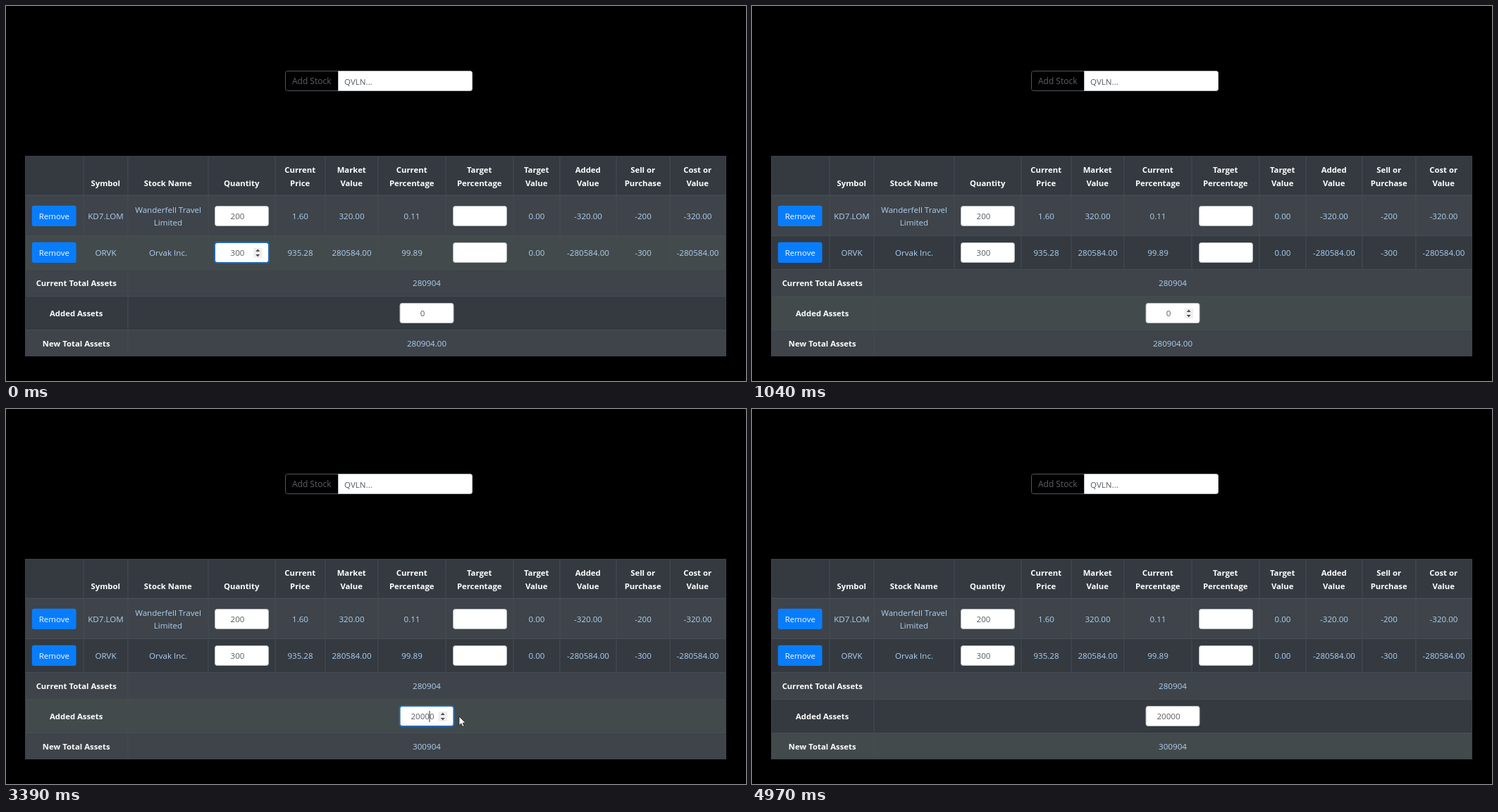
An HTML page for the animation above (5.01 s loop, 1050 px wide and 533 px high).

```html
<!DOCTYPE html>
<html lang="en">
<head>
<meta charset="utf-8">
<title>Portfolio table</title>
<style>
html, body { margin: 0; width: 100%; height: 100%; overflow: hidden; background: #000; }
svg { display: block; width: 1050px; height: 533px; }
text { font: 11.6px "Open Sans", "Noto Sans", sans-serif; fill: #b0d0f4; text-anchor: middle; }
.head { font-weight: 700; font-size: 11.35px; fill: #fff; }
.value { fill: #555b61; }
.start { text-anchor: start; }
.button { fill: #f8fbff; font-size: 11.5px; }
</style>
</head>
<body>
<svg id="stage" viewBox="0 0 1050 533"></svg>
<script>
const LOOP = 5010;
const stage = document.getElementById('stage');

function add(tag, attrs, content = '') {
  const el = document.createElementNS('http://www.w3.org/2000/svg', tag);
  set(el, attrs);
  el.textContent = content;
  return stage.appendChild(el);
}
function set(el, attrs) {
  for (const key in attrs) el.setAttribute(key, attrs[key]);
}
const rect = (x, y, width, height, fill, more) => add('rect', { x, y, width, height, fill, ...more });
const text = (x, y, content, cls = '') => add('text', { x, y, class: cls }, content);
const show = (el, on) => el.setAttribute('visibility', on ? 'visible' : 'hidden');
const clamp = v => Math.max(0, Math.min(1, v));

// Table frame
const cols = [27, 110, 173, 287, 382, 453, 528, 624, 720, 786, 866, 942, 1021];
const tops = [270, 326, 374, 412, 460, 498];
const BORDER = '#454d55', EDGE = '#3b4249', DARK = '#343a40', STRIPE = '#3e4449', HOVER = '#434a4b';
const mid = i => (cols[i] + cols[i + 1]) / 2;

rect(27, 213, 995, 57, DARK);
const rows = tops.slice(0, 5).map((y, i) => rect(27, y, 995, tops[i + 1] - y, DARK));
for (const y of [326, 374, 412, 460]) rect(27, y, 995, 1, BORDER);
rect(27, 268.5, 995, 1.5, BORDER);
cols.slice(1, -1).forEach(x => rect(x - 0.5, 213, 1, x === 173 ? 285 : 161, BORDER));
rect(27.5, 213.5, 994, 284, 'none', { stroke: EDGE });

// Table text
const heads = ['', 'Symbol', 'Stock Name', 'Quantity', 'Current Price', 'Market Value',
  'Current Percentage', 'Target Percentage', 'Target Value', 'Added Value',
  'Sell or_Purchase', 'Cost or_Value'];
heads.forEach((label, i) => {
  let lines = label.includes('_') ? label.split('_') : label.split(' ');
  if (i === 2) lines = [label];
  lines.forEach((line, n) => text(mid(i) - 0.3, 255.5 - 18.5 * (lines.length - 1 - n), line, 'head'));
});
const stocks = [
  ['', 'KD7.LOM', 'Wanderfell Travel|Limited', '', '1.60', '320.00', '0.11', '', '0.00',
    '-320.00', '-200', '-320.00'],
  ['', 'ORVK', 'Orvak Inc.', '', '935.28', '280584.00', '99.89', '', '0.00',
    '-280584.00', '-300', '-280584.00']
];
stocks.forEach((cells, r) => {
  const base = r ? 355 : 303;
  cells.forEach((cell, i) => {
    const lines = cell.split('|');
    lines.forEach((line, n) => text(mid(i), base + 18.5 * (n - (lines.length - 1) / 2), line));
  });
  rect(36.8, base - 19.2, 62.8, 29.2, '#087dfc', { rx: 3 });
  text(68.3, base, 'Remove', 'button');
});
['Current Total Assets', 'Added Assets', 'New Total Assets'].forEach((label, i) =>
  text(99.7, 398 + 43 * i, label, 'head'));
text(597, 398, '280904');
const total = text(597, 484, '');

// Number inputs
function input(x, y, value = '') {
  const box = rect(x + 0.5, y + 0.5, 76, 28, '#fff', { rx: 3, stroke: '#b4babf' });
  const glow = rect(x, y, 77, 29, 'none', { rx: 3.5, stroke: '#2468ae', 'stroke-width': 2 });
  const label = text(x + 32.5, y + 19.2, value, 'value');
  const panel = rect(x + 55, y + 8, 12.5, 14, '#efefef');
  const cx = x + 61.2;
  const arrows = add('path', { fill: '#505050',
    d: `M${cx - 3} ${y + 13}l3 -3.6l3 3.6zM${cx - 3} ${y + 17}l3 3.6l3 -3.6z` });
  return (focus, spinner, content = value) => {
    set(glow, { opacity: focus });
    set(box, { opacity: 1 });
    label.textContent = content;
    show(panel, spinner);
    show(arrows, spinner);
  };
}
input(296, 284, '200')(0, false);
input(634, 284)(0, false);
input(634, 336)(0, false);
const quantity = input(296, 336, '300');
const added = input(558.5, 422, '0');
const caret = rect(0, 429, 1, 16, '#333');

// Search group
rect(396.5, 92.5, 265, 28, '#000', { rx: 3, stroke: '#51575d' });
add('path', { d: 'M471.5 92.5H658.5a3 3 0 0 1 3 3V117.5a3 3 0 0 1-3 3H471.5z', fill: '#fff', stroke: '#b4babf' });
text(433.7, 111.2, 'Add Stock').setAttribute('style', 'font-size:12px;fill:#596067');
text(480, 111.5, 'QVLN...', 'value start');

// Pointer and click ring
const ring = add('circle', { fill: 'none', stroke: '#7c172a', 'stroke-width': 2.8 });
const pointer = add('path', { d: 'M0 0V12.6L2.9 9.9L4.9 14.4L7 13.5L5.1 9.2H9z',
  fill: '#fff', stroke: '#111', 'stroke-width': 0.7 });

const path = [[0, 340, 352], [270, 340, 352], [430, 400, 386], [810, 400, 386], [910, 519, 414],
  [1070, 583, 435.5], [2040, 583, 435.5], [2250, 643, 437], [4060, 643, 437], [4160, 625, 466],
  [4300, 625, 466], [4460, 612, 480], [LOOP, 612, 480]];
const clicks = [[600, 400, 386], [1740, 583, 435.5], [4800, 612, 480]];
const hovers = [[0, 1], [350, 2], [940, 3], [4300, 4]];
const typed = [[0, 0], [2650, 20], [2990, 200], [3160, 2000], [3360, 20000]];
const caretOn = [[1740, 2250], [2650, 3890], [4390, 4800]];

const latest = (list, t) => list.filter(item => item[0] <= t).pop();
const within = (t, [from, to]) => t >= from && t < to;

function position(t) {
  const i = path.findIndex(p => p[0] > t);
  const [t0, x0, y0] = path[i - 1], [t1, x1, y1] = path[i];
  const k = (t - t0) / (t1 - t0);
  return [x0 + (x1 - x0) * k, y0 + (y1 - y0) * k];
}

function render(t) {
  const hover = latest(hovers, t)[1];
  rows.forEach((row, i) => row.setAttribute('fill', i === hover ? HOVER : i % 2 ? DARK : STRIPE));

  quantity(1 - clamp((t - 600) / 150), t < 600);
  const amount = latest(typed, t)[1];
  const focus = clamp((t - 1740) / 150) - clamp((t - 4800) / 150);
  added(focus, within(t, [1010, 4800]), String(amount));
  // The total follows each key by 30 ms
  const sum = latest(typed, Math.max(0, t - 30))[1];
  total.textContent = sum ? 280904 + sum : '280904.00';

  // The caret stays before the last digit
  const half = String(amount).length / 2;
  caret.setAttribute('x', 590.5 + (half - 1) * 6.63 + (amount ? 0 : 0.5));
  show(caret, caretOn.some(span => within(t, span)));

  const click = latest(clicks, t);
  const age = click ? (t - click[0]) / 165 : 1;
  show(ring, age < 1);
  if (age < 1) set(ring, { cx: click[1], cy: click[2], r: 24.1 + age, opacity: 1 - age });

  pointer.setAttribute('transform', `translate(${position(t)})`);
  show(pointer, within(t, [330, 1010]) || within(t, [2225, 4390]));
}

const start = performance.now();
function frame() {
  render((performance.now() - start) % LOOP);
  requestAnimationFrame(frame);
}
frame();
</script>
</body>
</html>
```
